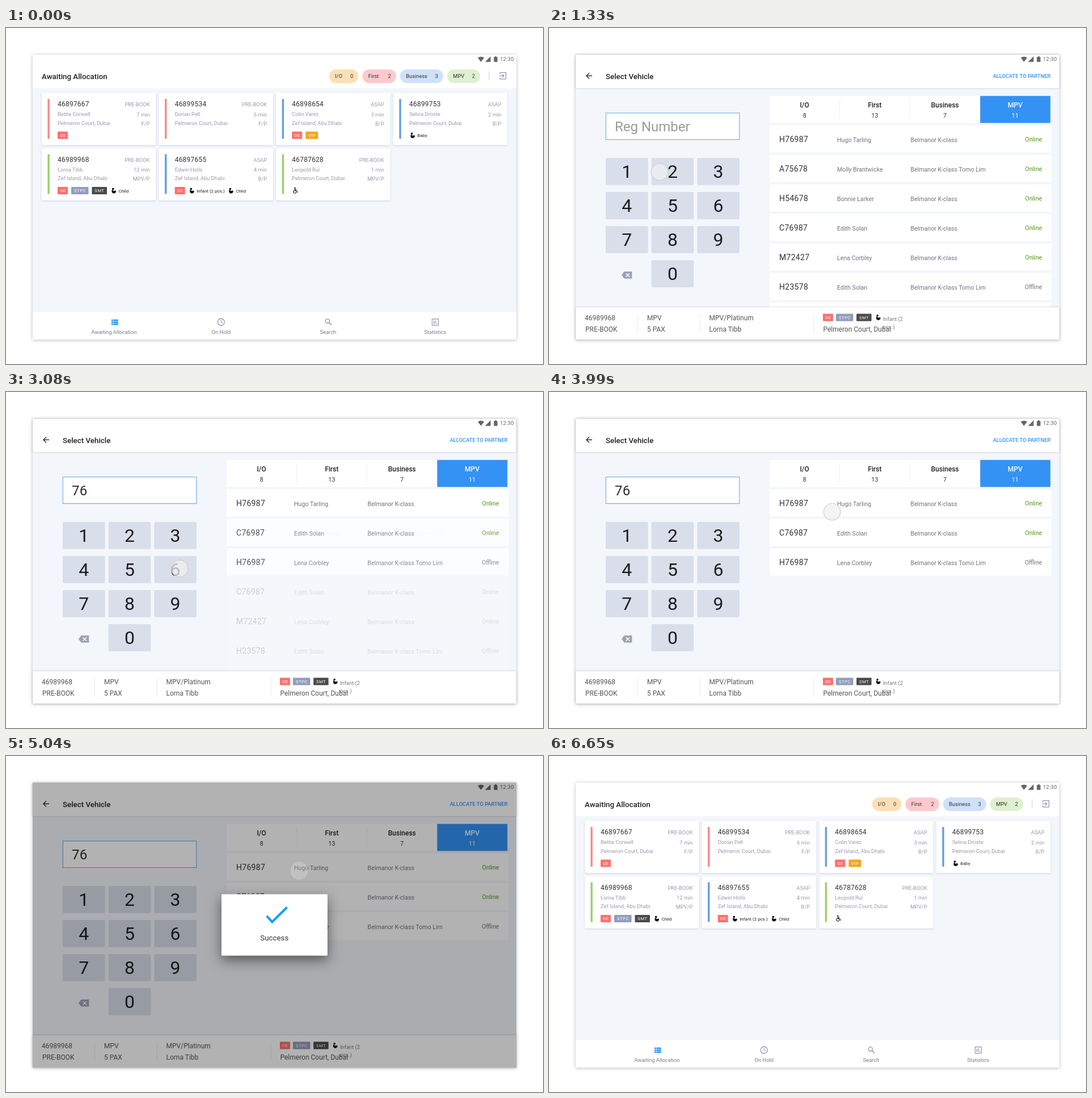
Write an HTML page that moves like this. It is 947 by 592 pixels and loops after 7.49 s.

```html
<!DOCTYPE html>
<html lang="en">
<head>
<meta charset="utf-8">
<title>Vehicle allocation</title>
<style>
  html, body { margin: 0; width: 100%; height: 100%; overflow: hidden; background: #fff; }
  svg { display: block; width: 947px; height: 592px; font-family: Roboto, sans-serif; }
  text { white-space: pre; }
  .device { filter: drop-shadow(0 1px 3px rgba(0, 0, 0, .26)); }
  .card { filter: drop-shadow(0 1px 1.5px rgba(60, 70, 100, .2)); }
  .bar { filter: drop-shadow(0 .5px 1.5px rgba(40, 50, 70, .3)); }
  .dialog { filter: drop-shadow(0 8px 11px rgba(0, 0, 0, .5)); }
</style>
</head>
<body>
<svg id="stage" viewBox="0 0 947 592"></svg>
<script>
const LOOP = 7490;
const RED = '#ff6e6e', BLUE = '#3492f5', MUTED = '#9a9aaf', INK = '#333', ICON = '#9496b4', BG = '#f3f6fb';

// Drawing helpers
const rect = (x, y, w, h, fill, more = '') =>
  `<rect x="${x}" y="${y}" width="${w}" height="${h}" fill="${fill}" ${more}/>`;
const text = (x, y, s, size, fill, more = '') =>
  `<text x="${x}" y="${y}" font-size="${size}" fill="${fill}" ${more}>${s}</text>`;
const line = (d, stroke, w = 1.3, more = '') =>
  `<path d="${d}" fill="none" stroke="${stroke}" stroke-width="${w}" ${more}/>`;
const fill = (d, color) => `<path d="${d}" fill="${color}"/>`;
const group = (id, body) => `<g id="${id}">${body}</g>`;
const at = (x, y, body) => `<g transform="translate(${x} ${y})">${body}</g>`;
const END = 'text-anchor="end"', MID = 'text-anchor="middle"', MEDIUM = 'font-weight="500"';

// Tags and small icons
const TAGS = { OE: [18, RED], VIP: [22, '#f5a623'], STPC: [30.5, '#929cbc'], SMT: [26.5, '#4a4a4a'] };

function tag(x, y, name) {
  const [w, color] = TAGS[name];
  return rect(x, y, w, 13, color, 'rx="1"') +
    text(x + w / 2 + .3, y + 9.2, name, 7.6, '#fff', `${MID} letter-spacing=".6"`);
}

const baby = (x, y) => at(x, y,
  '<circle cx="3.2" cy="1.8" r="1.8"/>' +
  fill('M1.2 3.6Q3.4 3.4 4.4 5.4L7.6 4.8Q9 5 8.6 6.8Q7.6 9.8 4.6 9.8Q0 9.4 1.2 3.6Z', '#111'));

const wheelchair = (x, y) => at(x, y,
  '<circle cx="3.6" cy="1.2" r="1.2"/>' +
  line('M3.7 2.6V6.2H6.8L8.4 9.2M3.7 4.2H6.4', '#111', 1.2) +
  line('M2.4 5.2A2.7 2.7 0 1 0 6.2 8.4', '#111', 1.1));

// First screen
const PALM = 'Pelmeron Court, Dubai', ZEF = 'Zef Island, Abu Dhabi';
const PINK = '#f98888', SKY = '#649ee6', GREEN = '#97d06a';
const CARDS = [
  [PINK, '46897667', 'PRE-BOOK', 'Bettie Corwell', '7 min', PALM, 'F/P', ['OE']],
  [PINK, '46899534', 'PRE-BOOK', 'Dorian Pell', '6 min', PALM, 'F/P', []],
  [SKY, '46898654', 'ASAP', 'Colin Varez', '3 min', ZEF, 'B/P', ['OE', 'VIP']],
  [SKY, '46899753', 'ASAP', 'Selina Droste', '2 min', PALM, 'B/P', ['Baby']],
  [GREEN, '46989968', 'PRE-BOOK', 'Lorna Tibb', '12 min', ZEF, 'MPV/P', ['OE', 'STPC', 'SMT', 'Child']],
  [SKY, '46897655', 'ASAP', 'Edwin Holls', '4 min', ZEF, 'B/P', ['OE', 'Infant (2 pcs.)', 'Child']],
  [GREEN, '46787628', 'PRE-BOOK', 'Leopold Rui', '1 min', PALM, 'MPV/P', ['wheelchair']]
];

function extras(list) {
  let x = 28, out = '';
  for (const name of list) {
    if (TAGS[name]) {
      out += tag(x, 68.3, name);
      x += TAGS[name][0] + 6;
    } else if (name === 'wheelchair') {
      out += wheelchair(x + 1.5, 69);
    } else {
      out += baby(x + 1.5, 70) + text(x + 14.5, 78.2, name, 8, '#222');
      x += 69;
    }
  }
  return out;
}

function card([color, id, kind, name, wait, place, type, list], i) {
  const x = 63 + i % 4 * 206.67, y = 114.3 + Math.floor(i / 4) * 97.4;
  const right = (dy, s) => text(190.5, dy, s, 9.33, MUTED, END);
  return at(x, y,
    rect(0, 0, 201.3, 92, '#fff', 'class="card" rx="1"') +
    rect(10.4, 10.7, 3.4, 70, color) +
    text(28, 23.9, id, 12, INK, 'letter-spacing=".22"') +
    text(28, 41, name, 9.33, MUTED) + text(28, 56.3, place, 9.33, MUTED) +
    right(24, kind) + right(41.6, wait) + right(57.3, type) + extras(list));
}

const pill = ([x, w, color, label, n]) =>
  rect(x, 73, w, 24, color, 'rx="12"') +
  text(x + 10.3, 88.3, label, 9.33, INK) + text(x + w - 9, 88.3, n, 9.33, INK, END);

function navIcons() {
  let list = '';
  for (let i = 0; i < 3; i++) {
    const y = 513.6 + i * 3.5;
    list += rect(186, y, 2.7, 2.7, BLUE) + rect(189.4, y, 8.3, 2.7, BLUE);
  }
  return list +
    `<circle cx="379.3" cy="518" r="6" fill="none" stroke="${ICON}" stroke-width="1.3"/>` +
    line('M379.3 514.3V518.3L382.2 520', ICON, 1.1) +
    `<circle cx="566.8" cy="516.3" r="3.7" fill="none" stroke="${ICON}" stroke-width="1.4"/>` +
    line('M569.5 519L574 523.4', ICON, 1.7) +
    line('M751.5 512.6H762.5V523.6H751.5ZM754.5 516.5V521.3M757 514.8V521.3M759.5 519V521.3', ICON, 1.2);
}

const home =
  rect(47, 47, 853, 502, '#fff') + rect(47, 106, 853, 394.5, BG) +
  text(63, 89.6, 'Awaiting Allocation', 13.33, '#222', MEDIUM) +
  [[570, 51.5, '#fce0b5', 'I/O', 0], [628.5, 59.5, '#fdc9cc', 'First', 2],
   [695, 76, '#cfe0f9', 'Business', 3], [778, 58, '#def0d0', 'MPV', 2]].map(pill).join('') +
  line('M852 76.5V92', '#ccced8', 1) +
  line('M871 81.5V78.7H881.6V89.8H871V87M870 84.2H878M875.3 81.5L878 84.2L875.3 87', ICON, 1.25) +
  CARDS.map(card).join('') + navIcons() +
  ['Awaiting Allocation', 'On Hold', 'Search', 'Statistics'].map((s, i) =>
    text(190.5 + i * 188.8, 538.7, s, 9.33, '#777b86', MID)).join('');

// Second screen
const CAR = 'Belmanor K-class', CAMPER = CAR + ' Tomo Lirn';
const ROWS = [
  ['H76987', 'Hugo Tarling', CAR, 1],
  ['A75678', 'Molly Brantwicke', CAMPER, 1],
  ['H54678', 'Bonnie Larker', CAR, 1],
  ['C76987', 'Edith Solan', CAR, 1],
  ['M72427', 'Lena Corbley', CAR, 1],
  ['H23578', 'Edith Solan', CAMPER, 0]
];
const MATCHES = [ROWS[3], ['H76987', 'Lena Corbley', CAMPER, 0]];

function row([reg, driver, car, online], i) {
  const y = 171.5 + i * 52;
  return rect(389, y, 497, 48, '#fff') +
    text(406, y + 29.7, reg, 14, INK, 'letter-spacing=".3"') +
    text(508, y + 29, driver, 10.67, '#71747f') + text(637.5, y + 29, car, 10.67, '#71747f') +
    text(869.5, y + 28.5, online ? 'Online' : 'Offline', 10.67, online ? '#4f9a0e' : '#71747f', END);
}

function tab([label, n], i) {
  const x = 389 + i * 123.8, on = i === 3;
  return rect(x, 119.7, 123.8, 47.6, on ? BLUE : '#fff') +
    (i === 1 || i === 2 ? line(`M${x} 126V160`, '#eceef2', 1) : '') +
    text(x + 61.7, 139.6, label, 12, on ? '#fff' : '#222', `${MID} ${MEDIUM}`) +
    text(x + 61.7, 158, n, 10.67, on ? '#fff' : INK, MID);
}

function key(n) {
  const k = n ? n - 1 : 10, x = 100 + k % 3 * 80.67, y = 229 + Math.floor(k / 3) * 60;
  return rect(x, y, 74.67, 47.7, '#d8deea', 'rx="2"') + text(x + 37.2, y + 35.3, n, 32, '#1c1c1c', MID);
}

const info = (x, a, b, dx = 0) => text(x, 514.7, a, 12, '#555') + text(x + dx, 534.7, b, 12, '#555');

const select =
  rect(47, 47, 853, 502, BG) + rect(47, 47, 853, 59, '#fff', 'class="bar"') +
  line('M76 84.3H66.5M71 79.3L66 84.3L71 89.3', INK, 1.5) +
  text(100, 89.6, 'Select Vehicle', 13.33, '#222', MEDIUM) +
  text(884.5, 88, 'ALLOCATE TO PARTNER', 9.33, BLUE, `${END} ${MEDIUM}`) +
  rect(100.3, 149.8, 235.5, 46.8, '#fff', 'stroke="#5aa6ee"') +
  group('hint', text(116, 182.4, 'Reg Number', 24, '#9b9b9b')) +
  group('seven', text(116, 182.4, '7', 24, '#2a2a2a')) +
  group('six', text(129.7, 182.4, '6', 24, '#2a2a2a')) +
  [1, 2, 3, 4, 5, 6, 7, 8, 9, 0].map(key).join('') +
  fill('M128 435.3L132.6 429H146.3V441.6H132.6Z', '#9aa3b5') +
  line('M135.7 432.2L142 438.5M142 432.2L135.7 438.5', '#fff', 1.4) +
  [['I/O', 8], ['First', 13], ['Business', 7], ['MPV', 11]].map(tab).join('') +
  row(ROWS[0], 0) +
  group('all', ROWS.slice(1).map((r, i) => row(r, i + 1)).join('') + rect(389, 483.5, 497, 9, '#fff')) +
  group('matches', MATCHES.map((r, i) => row(r, i + 1)).join('')) +
  rect(47, 492, 853, 57, '#fff', 'class="bar"') +
  line('M156.5 504V538M266.5 504V538M467 504V538', '#e8eaef', 1) +
  info(63, '46989968', 'PRE-BOOK', 1) + info(173, 'MPV', '5 PAX') +
  info(282.5, 'MPV/Platinum', 'Lorna Tibb') + info(483.5, '', PALM) +
  tag(483, 503.4, 'OE') + tag(506, 503.4, 'STPC') + tag(542.2, 503.4, 'SMT') + baby(576, 505) +
  text(589, 516, 'Infant (2', 9.33, '#777') + text(589, 530, 'pcs.)', 9.33, '#777');

const status =
  fill('M832 52.4Q837.6 48.4 843.2 52.4L837.6 59.8Z', '#666') +
  fill('M854.6 50V59.8H844.8Z', '#666') +
  fill('M860.3 51.2H862V50H865V51.2H866.7V59.8H860.3Z', '#666') +
  text(871, 58.3, '12:30', 9.6, '#666', 'letter-spacing=".1"');

const dialog =
  rect(380, 243.6, 187, 108.2, '#fff', 'class="dialog" rx="1.5"') +
  line('M459.7 281.8L469.3 292.4L495.5 266.5', '#0aa0fa', 4) +
  text(473.3, 324.5, 'Success', 13.33, INK, MID);

document.getElementById('stage').innerHTML =
  rect(47, 47, 853, 502, '#fff', 'class="device"') + home + group('select', select) + status +
  group('shade', rect(47, 47, 853, 502, '#000')) +
  '<circle id="cursor" r="15" fill="#f0f0f0" stroke="#c8c8c8"/>' +
  group('dialog', dialog);

// Motion
const el = id => document.getElementById(id);
const nodes = {};
for (const id of ['select', 'hint', 'seven', 'six', 'all', 'matches', 'shade', 'cursor', 'dialog']) nodes[id] = el(id);

const clamp = v => Math.min(1, Math.max(0, v));
const ease = (t, start, dur) => 1 - (1 - clamp((t - start) / dur)) ** 3;
const fade = (id, v) => nodes[id].setAttribute('opacity', v.toFixed(3));

// start, duration, x, y
const MOVES = [[345, 740, 195, 253.5], [1460, 650, 120, 380], [2104, 760, 306, 311], [3564, 760, 517, 202]];

function draw(t) {
  const out = 1 - ease(t, 6085, 560);
  const typed = ease(t, 2104, 360), filtered = ease(t, 2925, 380), done = ease(t, 4750, 300) * out;
  fade('select', ease(t, 1045, 300) * out);
  fade('hint', 1 - typed);
  fade('seven', typed);
  fade('six', ease(t, 2590, 300));
  fade('all', 1 - filtered);
  fade('matches', filtered);
  fade('shade', .3 * done);
  fade('dialog', done);

  let x = 804, y = 64;
  for (const [start, dur, tx, ty] of MOVES) {
    const p = ease(t, start, dur);
    x += (tx - x) * p;
    y += (ty - y) * p;
  }
  const c = nodes.cursor;
  c.setAttribute('cx', x.toFixed(2));
  c.setAttribute('cy', y.toFixed(2));
  c.setAttribute('fill-opacity', (.75 - .5 * ease(t, 4325, 320)).toFixed(3));
  fade('cursor', clamp((t - 345) / 70) * out);
}

function tick() {
  draw(performance.now() % LOOP);
  requestAnimationFrame(tick);
}
tick();
</script>
</body>
</html>
```
